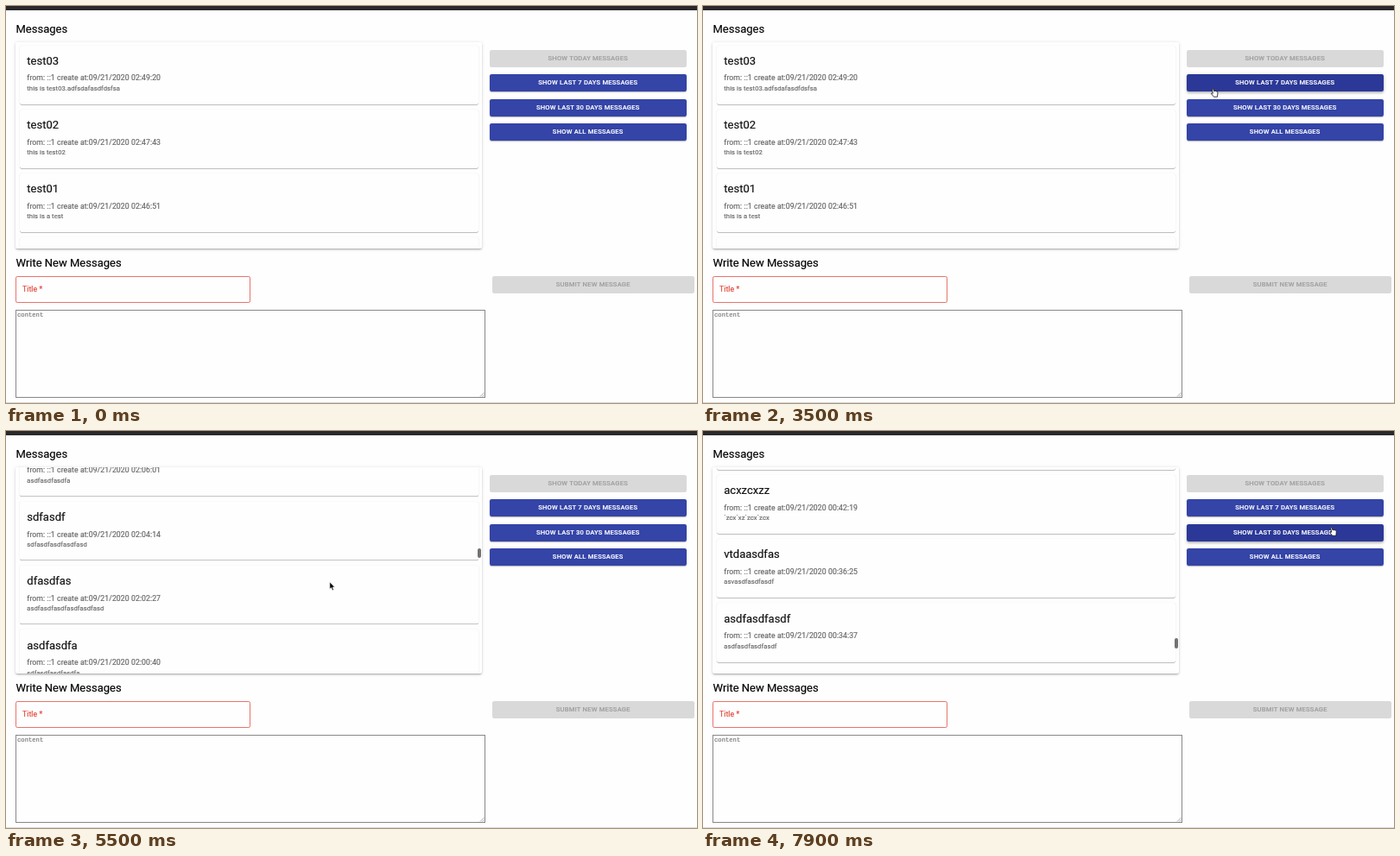
An HTML page that plays this animation: 800x460 px, repeating every 8 s.

```html
<!DOCTYPE html>
<html lang="en">
<head>
<meta charset="utf-8">
<title>Messages</title>
<style>
html, body { margin: 0; width: 100%; height: 100%; overflow: hidden; }
body {
  position: relative; background: #fefefe; color: #000;
  font-family: Roboto, sans-serif; -webkit-text-stroke: .18px;
}
div, svg { position: absolute; box-sizing: border-box; white-space: nowrap; }
.h { left: 11.5px; font-size: 13px; line-height: 20px; }
.bar { left: 0; top: 0; width: 100%; height: 5px; background: #2a282b; }
.foot { left: 0; top: 459px; width: 100%; height: 1px; background: #dcdcdc; }
.list {
  left: 11px; top: 42px; width: 540px; height: 239px; overflow: hidden;
  background: #fefefe; border-radius: 2px;
  box-shadow: 0 1.6px 1.6px -1px rgba(0,0,0,.2), 0 1.6px 2px rgba(0,0,0,.14), 0 .5px 4px rgba(0,0,0,.12);
}
.feed { left: 0; top: 0; width: 540px; overflow: hidden; }
.card {
  left: 4.5px; width: 531.5px; height: 68.4px; background: #fefefe; border-radius: 2px;
  box-shadow: 0 1px .6px -.5px rgba(0,0,0,.24), 0 .5px .6px rgba(0,0,0,.16), 0 .5px 1.6px rgba(0,0,0,.14);
}
.card div { left: 8.8px; }
.name { top: 8.4px; font-size: 13px; line-height: 20px; color: #111; }
.from { top: 31.9px; font-size: 8.68px; line-height: 12px; letter-spacing: .0094em; color: #666; }
.text { top: 45.4px; font-size: 7.6px; line-height: 10px; letter-spacing: .0107em; color: #666; }
.thumb { left: 545.8px; width: 4.2px; height: 11.6px; border-radius: 2.1px; background: #727272; }
.btn {
  left: 560px; width: 227.5px; height: 20px; border-radius: 2.2px; text-align: center;
  font-size: 7.6px; font-weight: 500; line-height: 20px; letter-spacing: .0286em;
  background: #3444a7; color: #fff;
  box-shadow: 0 1.6px .6px -1px rgba(0,0,0,.2), 0 1px 1px rgba(0,0,0,.14), 0 .5px 2.7px rgba(0,0,0,.12);
}
.btn.off { background: #d9d9d9; color: #a0a0a0; box-shadow: none; }
.btn.hover {
  background: #2b3897;
  box-shadow: 0 1px 2.2px -.5px rgba(0,0,0,.2), 0 2.2px 2.7px rgba(0,0,0,.14), 0 .5px 5.4px rgba(0,0,0,.12);
}
.field {
  left: 11px; top: 313px; width: 272px; height: 31px; padding-left: 7px;
  border: 1px solid #e8746c; border-radius: 2.2px; color: #e2483d;
  font-size: 8.68px; line-height: 28.5px; letter-spacing: .0094em;
}
.area {
  left: 11px; top: 352px; width: 544px; height: 102px; padding: 1px; border: 1px solid #888;
  font: 7.2px/9px "Liberation Mono", monospace; color: #757575;
}
svg { left: 0; top: 0; overflow: visible; }
</style>
</head>
<body>
<div class="bar"></div>
<div class="h" style="top:17px">Messages</div>
<div class="list"><div class="feed"></div></div>
<div class="thumb"></div>
<div class="btn off" style="top:51px">SHOW TODAY MESSAGES</div>
<div class="btn" style="top:79px">SHOW LAST 7 DAYS MESSAGES</div>
<div class="btn" style="top:107.6px">SHOW LAST 30 DAYS MESSAGES</div>
<div class="btn" style="top:136px">SHOW ALL MESSAGES</div>
<div class="h" style="top:288px">Write New Messages</div>
<div class="field">Title *</div>
<div class="btn off" style="left:563px;top:313px;width:233.5px">SUBMIT NEW MESSAGE</div>
<div class="area">content</div>
<svg width="800" height="460" fill="none" stroke="#888" stroke-width=".7">
  <path d="M549 452.5l4.5-4.5M551.5 452.5l2-2"/>
</svg>
<div class="foot"></div>
<svg id="cursor" width="12" height="14" stroke-linejoin="round">
  <path id="arrow" d="M0 0V8.2L1.8 6.5L3.1 9.7L4.6 9.1L3.3 6H5.8Z" fill="#000" stroke="#fff" stroke-width=".6"/>
  <path id="hand" d="M-.9 .6Q-.3 -.4 .5 .5L1.5 3.3Q3.5 2.6 4.4 3.6Q5.5 3.3 5.8 4.6L5.4 9.8H1.2L-1.6 6.3Q-2 5 .2 5.8Z" fill="#fff" stroke="#111" stroke-width=".8"/>
  <path id="beam" d="M-2 -5H2M0 -5V6M-2 6H2" fill="none" stroke="#333" stroke-width=".8"/>
</svg>
<script>
const LOOP = 8000, PITCH = 74.25, COUNT = 56;
const $ = s => document.querySelector(s);
const feed = $('.feed'), thumb = $('.thumb'), cursor = $('#cursor');
const buttons = [...document.querySelectorAll('.btn:not(.off)')];
const asdf = (n, from = 0) => 'asdf'.repeat(9).substr(from, n);

// Runs of messages by index of the first: title, time, text; the rest is filled in
const runs = {
  0: [
    ['test03', '02:49:20', 'this is test03.adfsdafasdfdsfsa'],
    ['test02', '02:47:43', 'this is test02'],
    ['test01', '02:46:51', 'this is a test']
  ],
  5: [['adsfasdf', '02:40:19', asdf(16)]],
  13: [
    ['asdfasdf', '02:30:38', asdf(24)],
    ['asdfadsfas', '02:30:05', asdf(24)],
    ['asasdf', '02:27:37', asdf(15)],
    ['asfgsdfgsdfg', '02:20:17', asdf(20, 1)]
  ],
  34: [
    ['sadfasdf', '01:48:12', 'adfasdfasdfasdfads'],
    ['asdfasdfa', '01:31:03', 'asdfasdfasdfasdfaf'],
    ['asdfadsfa', '01:20:55', 'asdfadsfadsfasdfasdfasdfaf'],
    ['asdfadsfa', '01:18:26', asdf(18)]
  ],
  48: [['adsfasdf', '00:46:42', 'adsfasdfasdfasdfasd']],
  53: [
    ['acxzcxzz', '00:42:19', '`zcx`xz`zcx`zcx'],
    ['vtdaasdfas', '00:36:25', 'asvasdfasdfasdf'],
    ['asdfasdfasdf', '00:34:37', asdf(16)]
  ]
};

// Linear interpolation through rows of [position, ...values]
function along(rows, p) {
  const n = rows.findIndex(r => r[0] > p);
  if (n < 0) return rows[rows.length - 1].slice(1);
  if (n === 0) return rows[0].slice(1);
  const a = rows[n - 1], b = rows[n], k = (p - a[0]) / (b[0] - a[0]);
  return a.slice(1).map((v, i) => v + (b[i + 1] - v) * k);
}

const seconds = s => s.split(':').reduce((sum, v) => sum * 60 + +v, 0);
const clock = s => [s / 3600, s / 60 % 60, s % 60].map(v => String(Math.floor(v)).padStart(2, '0')).join(':');

const messages = [];
for (const first in runs) runs[first].forEach((m, i) => messages[+first + i] = m);
const times = [];
messages.forEach((m, i) => times.push([i, seconds(m[1])]));

function add(parent, cls, text = '') {
  const el = document.createElement('div');
  el.className = cls;
  el.textContent = text;
  return parent.appendChild(el);
}

for (let i = 0; i < COUNT; i++) {
  const [title, , text] = messages[i] || [asdf(6 + i * 7 % 6, i % 3), '', asdf(13 + i * 5 % 12, i % 2)];
  const card = add(feed, 'card');
  card.style.top = 3.6 + i * PITCH + 'px';
  add(card, 'name', title);
  add(card, 'from', 'from: ::1 create at:09/21/2020 ' + clock(along(times, i)[0]));
  add(card, 'text', text);
}

// Time and depth
const scroll = [
  [3600, 0], [4100, 391], [4900, 1005], [6000, 2500], [6200, 2500], [6300, 2537], [7100, 3597], [7800, 3930]
];
// Fast flicks outrun painting for a moment: time and painted depth
const flicks = [[4000, 413], [7000, 3635]];
// Time and cursor position
const path = [
  [100, 672, 158], [200, 397, 396], [300, 397, 396], [400, 215, 449], [800, 31, 449],
  [1000, 545, 84], [1500, 434, 170], [2000, 515, 90], [2300, 619.5, 81.5], [2800, 628, 88],
  [2900, 660, 118], [3000, 628, 89.5], [3400, 628, 89.5], [4100, 363, 131], [4300, 374.8, 175],
  [7500, 374.8, 175], [7900, 727.5, 111.5]
];

function drawCursor(t) {
  const shown = t >= 100 && t < 500 || t >= 800;
  const [x, y] = shown ? along(path, t) : [-50, -50];
  const over = buttons.find(b => x > 560 && x < 787 && y >= b.offsetTop && y < b.offsetTop + 20);
  const kind = over ? 'hand' : y > 352 && y < 453 && x > 12 && x < 554 ? 'beam' : 'arrow';
  for (const id of ['arrow', 'hand', 'beam']) $('#' + id).style.display = id === kind ? '' : 'none';
  for (const b of buttons) b.classList.toggle('hover', b === over);
  cursor.style.transform = `translate(${x}px, ${y}px)`;
}

const start = performance.now();
function draw() {
  // The screen updates ten times a second
  const t = Math.floor((performance.now() - start) % LOOP / 100) * 100;
  const [y] = along(scroll, t), flick = flicks.find(f => t >= f[0] && t < f[0] + 200);
  feed.style.height = (flick ? flick[1] : COUNT * PITCH + 8) + 'px';
  feed.style.transform = `translateY(${-y}px)`;
  thumb.style.display = t > 3600 ? '' : 'none';
  thumb.style.top = 45.3 + y * .0496 + 'px';
  drawCursor(t);
  requestAnimationFrame(draw);
}
draw();
</script>
</body>
</html>
```
